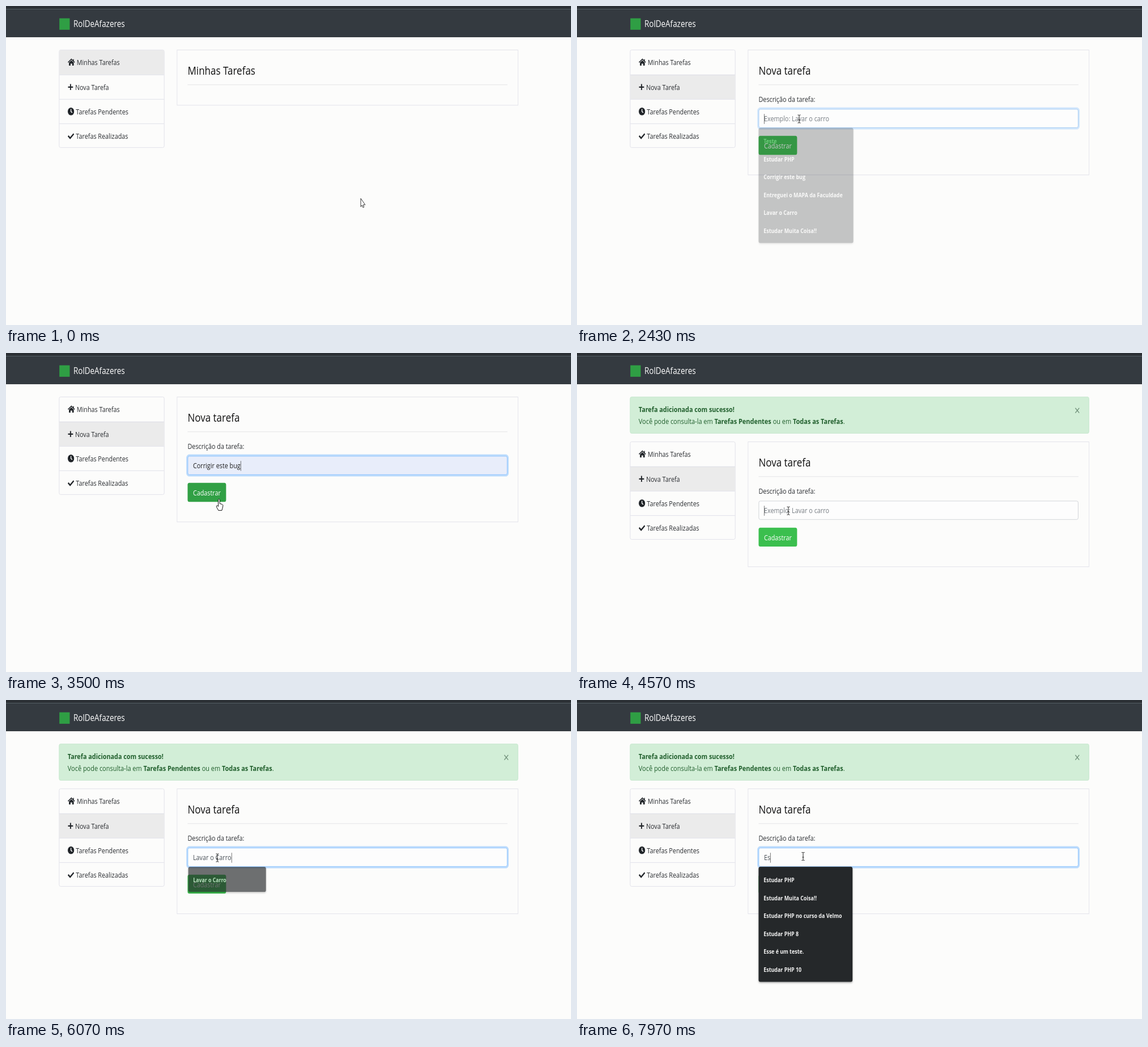
These frames come from a looping animation (997 by 562 pixels, 8 s). An HTML page:

```html
<!DOCTYPE html>
<html lang="pt-BR">
<head>
<meta charset="utf-8">
<title>Lista de tarefas</title>
<style>
* { box-sizing: border-box; }
html, body { margin: 0; width: 100%; height: 100%; overflow: hidden; background: #fcfcfb; }
body { position: relative; }
#strip { position: absolute; inset: 0 0 auto; height: 6px; background: #2b3035; border-bottom: 1px solid #59636a; }
/* a 1366px wide page, shown at the recording's aspect */
#page { position: absolute; top: 5px; left: 0; width: 1366px; height: 635px; transform: scale(.73, .8776);
  transform-origin: 0 0; font: 14.8px/24px "Open Sans", "Noto Sans", sans-serif; color: #2b2e32; white-space: nowrap; }
nav { height: 56.5px; background: #343a40; border-top: 1px solid #59636a; position: relative; }
nav i { position: absolute; left: 129px; top: 18px; width: 25px; height: 23px; background: #2f9e44; }
nav b { position: absolute; left: 163px; top: 16px; font-size: 18.4px; font-weight: 500; color: #fff; }
main { position: absolute; left: 128px; top: 82px; width: 1110px; }
#alert { position: relative; height: 74px; margin-bottom: 16px; padding: 12px 20px; background: #d2eed7;
  border: 1px solid #c0e5c8; border-radius: 4px; color: #22602e; }
#alert div { font-size: 15px; }
#alert span { position: absolute; right: 21px; top: 14px; font-size: 24px; color: #71907a; }
#row { position: relative; }
ul { margin: 0; padding: 0; list-style: none; width: 255px; border: 1px solid #dcdde6; border-radius: 4px; }
li { height: 49px; padding: 12px 20px; }
li + li { border-top: 1px solid #dcdde6; }
li:last-child { height: 48px; }
li.on { background: #ebebeb; }
li svg { height: 16px; vertical-align: -2px; margin-right: 4px; fill: none; stroke: #212529; }
#card { position: absolute; left: 285px; top: 0; width: 825px; border: 1px solid #dfdfe8; }
#card > *, #form > * { position: absolute; left: 25px; }
#card #form { left: 0; top: 0; }
#title { top: 26px; font-size: 23.3px; line-height: 29px; color: #111; font-weight: 400; margin: 0; }
#line { top: 69px; width: 773px; height: 1px; background: #e0e0e4; }
#label { top: 86px; }
#field { top: 118px; width: 773px; height: 38px; padding: 6px 12px; border: 1px solid; border-radius: 4px; color: #495057; }
#caret { display: inline-block; width: 1px; height: 20px; margin-right: -1px; vertical-align: -5px; background: #444; }
#button { top: 172px; width: 93px; height: 38px; line-height: 38px; text-align: center; color: #fff; border-radius: 4px; }
#popup { top: 156px; width: max-content; min-width: 191px; padding: 8px 0 7.2px; background: #25282a; color: #f4f4f4;
  font-size: 12.2px; font-weight: 700; border-radius: 4px; box-shadow: 0 2px 4px #0005; }
#popup div { height: 36px; padding: 0 26px 0 12px; line-height: 37px; }
#status { position: absolute; left: 0; bottom: 0; height: 21px; padding: 0 6px; border-radius: 0 3px 0 0;
  background: #36383a; color: #dcdcdc; font-size: 10.9px; line-height: 21px; }
#cursor { position: absolute; left: 0; top: 0; width: 1px; height: 1px; overflow: visible; }
</style>
</head>
<body>
<div id="strip"></div>
<div id="page">
  <nav><i></i><b>RolDeAfazeres</b></nav>
  <main>
    <div id="alert"><b>Tarefa adicionada com sucesso!</b><div>Você pode consulta-la em <b>Tarefas Pendentes</b> ou em <b>Todas as Tarefas</b>.</div><span>×</span></div>
    <div id="row">
      <ul>
        <li id="home"><svg width="18" viewBox="0 0 18 16"><path d="M1 8.5 9 2l8 6.5M14 2v4" stroke-width="2"/><path d="M3.2 9 9 4.5 14.8 9v6H11v-4H7v4H3.2z" fill="#212529" stroke="none"/></svg>Minhas Tarefas</li>
        <li id="new"><svg width="14" viewBox="0 0 14 16"><path d="M7 2v12M1 8h12" stroke-width="2.6"/></svg>Nova Tarefa</li>
        <li><svg width="16" viewBox="0 0 16 16"><circle cx="8" cy="8" r="7.8" fill="#212529" stroke="none"/><path d="M8 3v5l3 2.5" stroke="#fff" stroke-width="1.8"/></svg>Tarefas Pendentes</li>
        <li><svg width="16" viewBox="0 0 16 16"><path d="M1.2 8 6 12.6 14.8 3.8" stroke-width="3"/></svg>Tarefas Realizadas</li>
      </ul>
      <div id="card">
        <h4 id="title"></h4>
        <div id="line"></div>
        <div id="form">
          <div id="label">Descrição da tarefa:</div>
          <div id="field"><span id="value"></span><span id="caret"></span><span id="hint"></span></div>
          <div id="button">Cadastrar</div>
          <div id="popup"></div>
        </div>
      </div>
    </div>
  </main>
  <div id="status"></div>
</div>
<svg id="cursor"><path id="shape"/></svg>
<script>
const $ = id => document.getElementById(id);
const clamp = v => Math.max(0, Math.min(1, v));
const within = (t, spans) => spans.find(([a, b]) => t >= a && t < b);

const LOADED = 800, SAVED = 3900, SAVED_AGAIN = 6600, PICKED = 2940, FADE = 130;
const recent = ['Teste', 'Estudar PHP', 'Corrigir este bug', 'Entreguei o MAPA da Faculdade', 'Lavar o Carro', 'Estudar Muita Coisa!!'];
const studies = ['Estudar PHP', 'Estudar Muita Coisa!!', 'Estudar PHP no curso da Velmo', 'Estudar PHP 8', 'Esse é um teste.', 'Estudar PHP 10'];
const startingWithE = ['Estudar PHP', 'Entreguei o MAPA da Faculdade', ...studies.slice(1, 5)];
const focusSpans = [[2330, 3680], [4570, 6460], [7060, 8000]];
const popupSpans = [[2400, PICKED], [4600, 6027], [7530, 9000]];

// time, x, y of the pointer's hot spot
const track = [[30, 626, 339], [620, 168, 147], [1500, 168, 147], [1730, 312.5, 169.5], [2080, 392, 199],
  [2500, 392, 199], [2880, 389.5, 302], [3170, 389.5, 302], [3620, 373, 248], [3850, 373, 250], [4080, 373, 278],
  [6110, 373, 278], [6440, 373, 325], [6640, 373, 325], [6800, 375.5, 317], [6850, 375.5, 317], [7040, 399, 275.5], [8000, 399, 275.5]];
const shapes = {
  arrow: ['M0 0V14.6L2.2 12 4 16.2 5.8 15.2 4.1 11.2H7.8Z', '#fff', '#222', .9],
  hand: ['M-1.3 1Q0-1 1.3 1V8L5.8 9.3Q7.2 10 7 12L6 16.5 5 20H-1L-4.3 14Q-5 11.5-3.5 11.2L-1.3 13Z', '#fff', '#111', 1],
  beam: ['M-2.5-7H-.7L0-6.2.7-7H2.5M-2.5 7H-.7L0 6.2.7 7H2.5M0-6.2V6.2M-1.5 1.5H1.5', 'none', '#222', 1]
};

function pointer(t) {
  const i = track.findIndex(k => k[0] > t);
  if (i < 1) return track[0].slice(1);
  const [a, b] = [track[i - 1], track[i]];
  const u = (t - a[0]) / (b[0] - a[0]), e = u * u * (3 - 2 * u);
  return [a[1] + (b[1] - a[1]) * e, a[2] + (b[2] - a[2]) * e];
}

function popupItems(t) {
  if (t < 4970) return recent;
  if (t < 7000) return ['Lavar o Carro'];
  return t < 7800 ? startingWithE : studies;
}

function fieldText(t, hovered) {
  if (t < SAVED) return hovered < 0 ? '' : recent[hovered];
  if (t >= 4970 && t < SAVED_AGAIN) return 'Lavar o Carro'.slice(0, Math.floor((t - 4970) / 68) + 1);
  if (t >= 7500) return t < 7800 ? 'E' : 'Es';
  return '';
}

function render(t) {
  const form = t >= LOADED, saved = t >= SAVED, shift = saved ? 79 : 0;
  const [x, y] = pointer(t);
  const inside = (l, top, r, bottom) => x > l && x < r && y > top + shift && y < bottom + shift;

  $('alert').style.display = saved ? '' : 'none';
  $('home').className = form ? '' : 'on';
  $('new').className = form ? 'on' : '';
  $('title').textContent = form ? 'Nova tarefa' : 'Minhas Tarefas';
  $('card').style.height = (form ? 252 : 112) + 'px';
  $('form').style.display = form ? '' : 'none';

  // field
  let hovered = -1;
  if (t >= PICKED && t < SAVED) hovered = 2;
  else if (t > 2500 && t < PICKED && y > 221) hovered = Math.min(2, Math.floor((y - 221) / 31.6));
  const text = fieldText(t, hovered);
  const focus = within(t, focusSpans), glow = focus ? clamp((t - focus[0]) / 150) : 0;
  const mix = (a, b) => Math.round(a + (b - a) * glow);
  const field = $('field').style;
  field.background = hovered < 0 ? '#fdfdfd' : '#e8edfa';
  field.borderColor = `rgb(${mix(202, 128)},${mix(206, 189)},${mix(210, 255)})`;
  field.boxShadow = `0 0 0 3.2px rgba(0,123,255,${.25 * glow})`;
  $('value').textContent = text;
  $('value').style.color = hovered < 0 ? '' : '#222';
  $('hint').textContent = text ? '' : 'Exemplo: Lavar o carro';
  $('hint').style.color = '#777d83';
  $('caret').style.visibility = focus ? 'visible' : 'hidden';

  // suggestions
  const span = popupSpans.find(([a, b]) => t >= a && t < b + FADE);
  const popup = $('popup');
  popup.style.display = span ? '' : 'none';
  if (span) {
    const out = clamp((t - span[1]) / FADE);
    popup.style.opacity = Math.min(clamp((t - span[0]) / 120), 1 - out);
    popup.style.transform = `scale(${1 - .05 * out})`;
    popup.replaceChildren(...popupItems(t).map((item, i) => {
      const div = document.createElement('div');
      div.textContent = item;
      if (i === hovered) div.style.background = '#484c4f';
      return div;
    }));
  }

  // status bar
  $('status').textContent = 'localhost/app_tarefa/www/nova_tarefa.php' + (t < 870 ? '' : '#');
  $('status').style.opacity = Math.min(clamp((t - 560) / 100), clamp((1900 - t) / 100));

  // pointer
  const overButton = form && inside(320, 228, 388, 262);
  const overMenu = inside(93, 77, 280, 249);
  const overField = form && inside(320, 181, 885, 214);
  $('button').style.background = overButton ? '#31a045' : '#3bbf4e';
  const [d, fill, stroke, width] = shapes[overButton || overMenu ? 'hand' : overField ? 'beam' : 'arrow'];
  const attrs = { d, fill, stroke, 'stroke-width': width, transform: `translate(${x} ${y})` };
  for (const name in attrs) $('shape').setAttribute(name, attrs[name]);
}

function tick() {
  render(performance.now() % 8000);
  requestAnimationFrame(tick);
}
tick();
</script>
</body>
</html>
```
